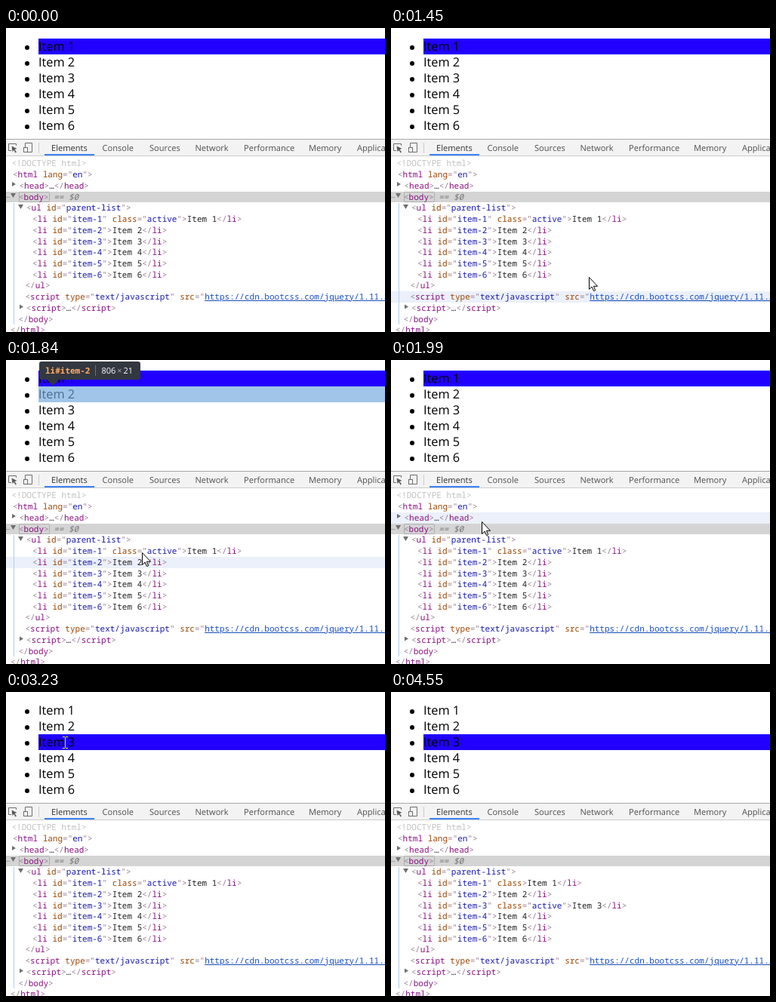
Write an HTML page that moves like this. It is 502 px wide and 403 px high and loops after 5100 ms.

```html
<!DOCTYPE html>
<html lang="en">
<head>
<meta charset="utf-8">
<title>Inspecting a list</title>
<style>
html, body { margin: 0; width: 100%; height: 100%; overflow: hidden; background: #fff; }
#stage { position: relative; width: 502px; height: 403px; overflow: hidden; background: #fff; text-rendering: geometricPrecision; }
#stage div, #stage svg { position: absolute; }
#page { left: 0; top: 0; width: 502px; height: 147px; overflow: hidden; font: 16.3px/21px "Open Sans", sans-serif; color: #000; }
.item { left: 43px; width: 806px; height: 21px; }
.item.on { background: #2100ff; }
.item::before { content: ""; position: absolute; left: -18px; top: 9px; width: 6px; height: 6px; border-radius: 50%; background: #000; }
#box { background: rgba(111, 168, 220, .66); }
#box.body { box-shadow: 0 0 0 8px rgba(246, 178, 107, .66); }
#tip { display: flex; align-items: center; height: 24px; padding: 0 10px 0 8px; border-radius: 3px; background: #333740; color: #fff; font: 11px "Open Sans", sans-serif; white-space: pre; }
#tip b { font: bold 11px "Noto Sans Mono", monospace; color: #ffab66; }
#tip u { width: 1px; height: 14px; margin: 0 7px; background: #6b6e76; }
#tip s { text-decoration: none; color: #aaa; margin: 0 2px; }
#tip::after { content: ""; position: absolute; left: 10px; border: 8px solid transparent; }
#tip.above::after { top: 24px; border-top-color: #333740; }
#tip.below::after { bottom: 24px; border-bottom-color: #333740; }
#tip b .cls { color: #8ed3fb; }
#bar { left: 0; top: 147px; width: 502px; height: 21px; background: #f3f3f3; border-top: 1px solid #a8a8a8; border-bottom: 1px solid #ccc; font: 11.1px/24px "Open Sans", sans-serif; color: #505050; }
#bar .on { color: #333; }
#mark { left: 51px; top: 19px; width: 66px; height: 2px; background: #3e82f7; }
.row { white-space: pre; height: 15px; font: 11px/14.73px "Noto Sans Mono", "DejaVu Sans Mono", monospace; color: #9a7f97; }
.band { left: 0; width: 502px; height: 15px; }
#hover { background: #ebf0fa; }
.n { color: #881280; } .k { color: #994500; } .v { color: #1a1aa6; } .t { color: #222; } .doc { color: #c0c0c0; }
.eq { color: #777; font-style: italic; }
.url { color: #1a4fb8; text-decoration: underline; }
.flash { background: var(--bg); border-radius: 2px; }
.k.flash { color: var(--k); } .v.flash { color: var(--v); }
.after, .moved .before { display: none; }
.moved .after { display: inline; }
#beam { mix-blend-mode: difference; }
</style>
</head>
<body>
<div id="stage">
  <div id="page"><div id="box"></div><div id="tip"></div></div>
  <div id="bar">
    <svg width="48" height="21" fill="none" stroke="#6e6e6e" style="left:0;top:0">
      <path d="M7 14.5H3.5V5.5H13.5V8"/><path d="M7.5 8.5L14.5 12L11.5 13L14 16.5L12.5 17.5L10.5 14L8.5 16Z" fill="#5a5a5a" stroke="none"/>
      <path d="M25.5 10V4.5H34.5V16.5H29"/><rect x="23.5" y="10.5" width="5" height="6"/>
      <path d="M43.5 4V18" stroke="#ccc"/>
    </svg>
    <div id="mark"></div>
  </div>
  <div id="hover" class="band"></div>
  <div class="band" style="top:217px;height:14px;background:#d4d4d4"></div>
  <svg width="60" height="403" style="left:0;top:0">
    <path d="M10.5 232V393" stroke="#b4cdee"/>
    <path d="M8 204L13 207L8 210ZM6 219H13L9.5 225ZM16 234H23L19.5 240ZM18 366.5L23 369.5L18 372.5Z" fill="#6e6e6e"/>
    <path d="M0 224.5H5" stroke="#777" stroke-dasharray="1 1"/>
    <rect x="17.5" y="217.5" width="40" height="13" rx="1" fill="none" stroke="#888" stroke-dasharray="1 1"/>
  </svg>
  <div id="code"></div>
  <svg id="arrow" width="13" height="20" viewBox="-.5 -.5 13 20">
    <path d="M0 0V16L3.6 12.6L6 18L8.2 17.2L5.9 11.8H11Z" fill="#fff" stroke="#000"/>
  </svg>
  <svg id="beam" width="7" height="16"><path d="M0 .5H3M4 .5H7M3.5 1V15M0 15.5H3M4 15.5H7" stroke="#fff"/></svg>
</div>
<script>
const $ = id => document.getElementById(id);
const stage = $('stage'), box = $('box'), tip = $('tip'), hover = $('hover'), arrow = $('arrow'), beam = $('beam');
const LOOP = 5100, PICK = 3230, UPDATE = 3320, FADED = 4550, LAG = 65;
const ROW_TOP = 172.4, ROW_H = 14.73;
const rowY = i => Math.round(ROW_TOP + ROW_H * i);

// Page and toolbar
const items = [1, 2, 3, 4, 5, 6].map(n => {
  const el = document.createElement('div');
  el.className = 'item';
  el.style.top = 14 + 21 * (n - 1) + 'px';
  el.textContent = 'Item ' + n;
  $('page').insertBefore(el, box);
  return el;
});
const tabs = { Elements: 60, Console: 127.5, Sources: 190, Network: 250.5, Performance: 315, Memory: 401, Application: 465 };
for (const [name, x] of Object.entries(tabs))
  $('bar').insertAdjacentHTML('beforeend', `<div class="${x === 60 ? 'on' : ''}" style="left:${x}px">${name}</div>`);

// Markup tree
const span = (cls, s) => `<span class="${cls}">${s}</span>`;
const attr = (k, v, cls = 'v') => ` ${span('k', k)}="${span(cls, v)}"`;
const open = (name, attrs = '') => `&lt;${span('n', name)}${attrs}&gt;`;
const close = name => `&lt;/${span('n', name)}&gt;`;
const folded = name => open(name) + span('t', '…') + close(name);
const extra = {
  1: span('before', attr('class', 'active')) + span('after', ' ' + span('k flash', 'class')),
  3: span('after', attr('class', 'active', 'v flash'))
};
const li = n => [35, open('li', attr('id', 'item-' + n) + (extra[n] || '')) + span('t', 'Item ' + n) + close('li')];
const rows = [
  [7.5, span('doc', '&lt;!DOCTYPE html&gt;')],
  [9, open('html', attr('lang', 'en'))],
  [17.5, folded('head')],
  [17, open('body') + span('eq', ' == $0')],
  [27, open('ul', attr('id', 'parent-list'))],
  ...[1, 2, 3, 4, 5, 6].map(li),
  [25.5, close('ul')],
  [25.5, open('script', attr('type', 'text/javascript') + attr('src', 'https://cdn.bootcss.com/jquery/1.11.3/jquery.min.js', 'url')) + close('script')],
  [27, folded('script')],
  [16.5, close('body')],
  [6, close('html')]
];
$('code').innerHTML = rows.map(([x, html], i) =>
  `<div class="row" style="left:${x}px;top:${rowY(i) + 1}px">${html}</div>`).join('');

const ticks = [0, 1160, 1220, 1300, 1380, 1460, 1530, 1610, 1690, 1770, 1840, 1920, 1990, 2070, 2150,
  2220, 2300, 2380, 2460, 2540, 2620, 2690, 2770, 3230, 3320, 3390, 3470, 3550, 3700,
  3860, 3940, 4010, 4090, 4160, 4240, 4400, 4550];

// Pointer path: time, x, y
const path = [
  [1160, 277, 401], [1380, 262, 330], [1530, 244, 275], [1610, 240, 263], [1690, 236, 298],
  [1840, 180, 255], [1920, 125, 216], [1990, 120, 214], [2150, 135, 110], [2380, 100, 86],
  [2690, 75.5, 70], [2770, 78.5, 67], [3700, 78.5, 67], [3860, 120, 85], [4010, 250, 140],
  [4090, 281, 209], [4160, 300, 385], [4240, 310, 420]
];
const mix = (a, b, u) => a + (b - a) * u;
function pointer(t) {
  const i = path.findIndex(p => p[0] > t);
  if (i < 1) return null;
  const [a, b] = [path[i - 1], path[i]];
  const u = (t - a[0]) / (b[0] - a[0]);
  return { x: mix(a[1], b[1], u), y: mix(a[2], b[2], u) };
}

const show = (el, on) => { el.style.visibility = on ? 'visible' : 'hidden'; };
function place(el, x, y, w, h) {
  Object.assign(el.style, { left: x + 'px', top: y + 'px' });
  if (w) Object.assign(el.style, { width: w + 'px', height: h + 'px' });
}

function drawInspector(row, moved) {
  const n = row - 4, isItem = n >= 1 && n <= 6, isBody = row === 3 || row === 14;
  show(hover, row >= 0);
  if (row >= 0) hover.style.top = rowY(row) + 'px';
  show(box, isItem || isBody);
  show(tip, isItem || isBody);
  box.className = isBody ? 'body' : '';
  let name = 'body', w = 846, h = 126;
  if (isBody) {
    place(box, 3, 14, w, h);
    place(tip, 4, 0);
    tip.className = '';
  } else if (isItem) {
    const top = 14 + 21 * (n - 1);
    w = 806;
    h = 21;
    name = 'li#item-' + n + (n === (moved ? 3 : 1) ? span('cls', '.active') : '');
    place(box, 43, top, w, h);
    place(tip, 44, n === 1 ? top + 30 : top - 33);
    tip.className = n === 1 ? 'below' : 'above';
  }
  tip.innerHTML = `<b>${name}</b><u></u>${w}<s>×</s>${h}`;
}

function drawFlash(t) {
  const p = Math.min(1, Math.max(0, (t - UPDATE) / (FADED - UPDATE)));
  const e = 1 - Math.pow(1 - Math.min(1, p / .8), 1.3);
  const alpha = p < .8 ? 1 : (1 - p) / .2;
  const blend = (from, to) => from.map((c, i) => Math.round(mix(c, to[i], e)));
  const white = [255, 255, 255];
  stage.style.setProperty('--bg', `rgba(${blend([158, 54, 153], [245, 219, 244])},${alpha})`);
  stage.style.setProperty('--k', `rgb(${blend(white, [153, 69, 0])})`);
  stage.style.setProperty('--v', `rgb(${blend(white, [26, 26, 166])})`);
}

function draw(now) {
  const t = ticks.filter(k => k <= now % LOOP).pop();
  const moved = t >= UPDATE;
  items.forEach((el, i) => el.classList.toggle('on', i === (t >= PICK ? 2 : 0)));
  stage.classList.toggle('moved', moved);
  drawFlash(t);

  const at = pointer(t), past = pointer(t - LAG);
  const overText = at && at.y < 140 && at.x < 96;
  show(arrow, at && !overText);
  show(beam, overText);
  if (at) {
    place(arrow, Math.round(at.x), Math.round(at.y));
    place(beam, Math.round(at.x - 3.5), Math.round(at.y - 8));
  }
  const row = at && past && past.y > ROW_TOP ? Math.floor((past.y - ROW_TOP) / ROW_H) : -1;
  drawInspector(row, moved);
}

const start = performance.now();
function loop() {
  draw(performance.now() - start);
  requestAnimationFrame(loop);
}
loop();
</script>
</body>
</html>
```
